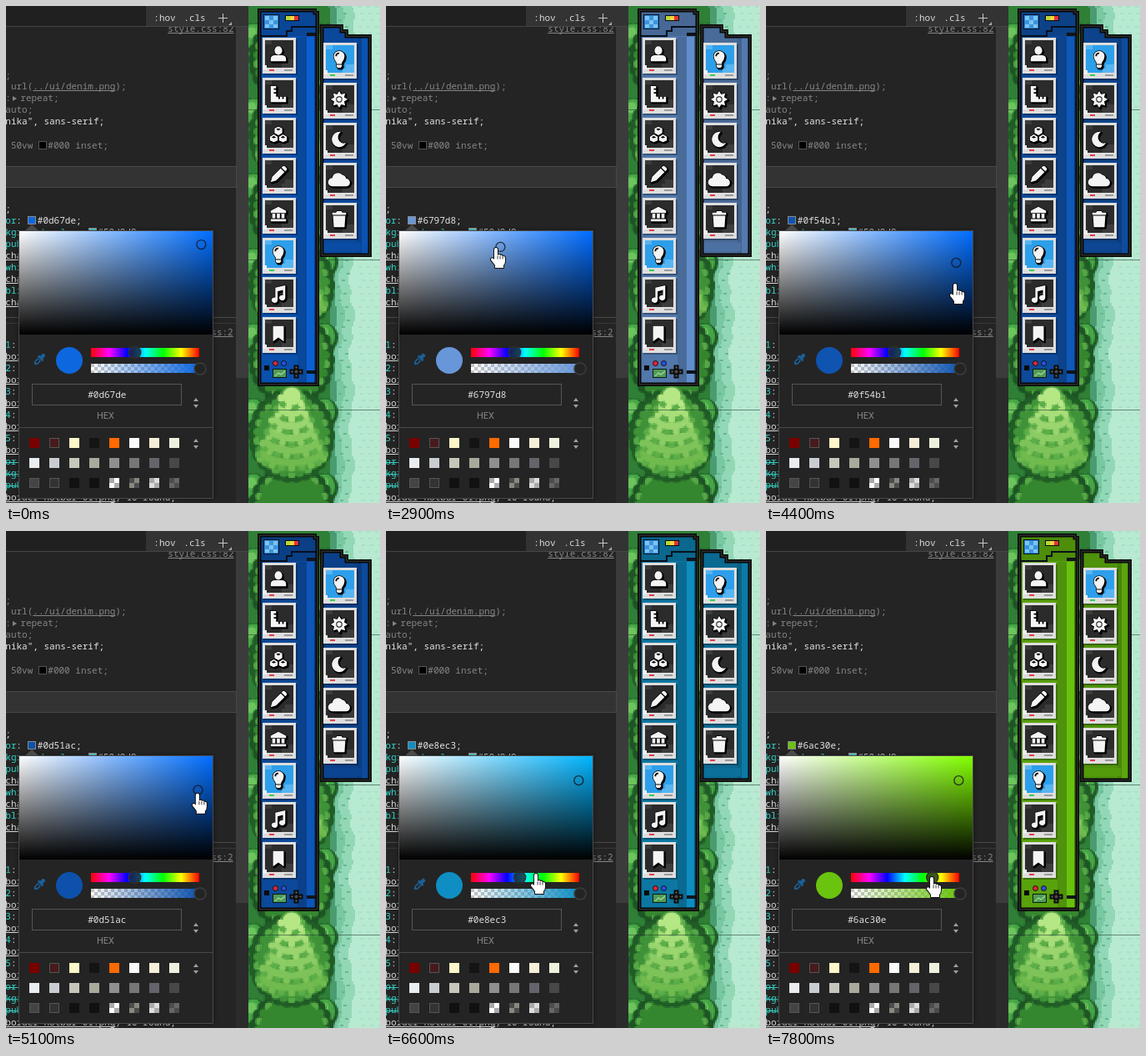
Animation of 449x596 px, one loop 8000 ms. Source, as an HTML page with a canvas:

```html
<!DOCTYPE html>
<html lang="en">
<head>
<meta charset="utf-8">
<title>Theme colour picker</title>
<style>
html, body { margin: 0; width: 449px; height: 596px; overflow: hidden; background: #242424; }
canvas { display: block; }
</style>
</head>
<body>
<canvas id="stage" width="449" height="596"></canvas>
<script>
const ctx = document.getElementById('stage').getContext('2d');
const LOOP = 8000, STEP = 100;
const MONO = '11px "Noto Sans Mono", "DejaVu Sans Mono", monospace';
const CYAN = '#35d4c7', GREY = '#858585', LIGHT = '#d8d8d8';

// ---------- colour ----------
function hexToHsv(hex) {
  const [r, g, b] = [1, 3, 5].map(i => parseInt(hex.substr(i, 2), 16) / 255);
  const v = Math.max(r, g, b), d = v - Math.min(r, g, b);
  let h = 0;
  if (d) h = v === r ? ((g - b) / d + 6) % 6 : v === g ? (b - r) / d + 2 : (r - g) / d + 4;
  return [h * 60, v ? d / v : 0, v];
}
function hsvToRgb(h, s, v) {
  return [5, 3, 1].map(n => {
    const k = (n + h / 60) % 6;
    return Math.round(255 * (v - v * s * Math.max(0, Math.min(k, 4 - k, 1))));
  });
}
const css = (c, k = 1) => `rgb(${c.map(n => Math.round(Math.min(255, n * k))).join(',')})`;
const toHex = c => '#' + c.map(n => n.toString(16).padStart(2, '0')).join('');

// ---------- timeline ----------
const DEEP = hexToHsv('#0e5cc3');
const COLORS = [
  [2000, ...hexToHsv('#0d67de')],
  [2900, ...hexToHsv('#6797d8')],
  [3800, 214, 0.74, 0.7],
  [4400, ...hexToHsv('#0f54b1')],
  [4600, 214, 0.92, 0.55],
  [4700, 214, 0.92, 0.55],
  [5400, ...DEEP],
  [6300, ...DEEP],
  [6600, ...hexToHsv('#0e8ec3')],
  [6800, 146, DEEP[1], DEEP[2]],
  [7200, 116, DEEP[1], DEEP[2]],
  [7800, ...hexToHsv('#6ac30e')]
];
// each run: shape, then time / x / y of the pointer tip
const RUNS = [
  ['arrow', [300, 402, 3], [400, 386, 14], [500, 370, 18], [600, 360, 6], [700, 360, 6]],
  ['hand', [1500, 316, 61], [1600, 331, 42]],
  ['arrow', [1600, 331, 42], [1900, 217, 298]],
  ['hand', [1900, 217, 300], [2000, 217, 300], [2100, 226, 290], [2900, 132, 290],
    [3800, 186, 318], [4400, 227, 333], [4700, 227, 336], [5400, 232, 299], [5700, 232, 299]],
  ['arrow', [5700, 194, 374], [5900, 166, 412]],
  ['hand', [5900, 160, 418], [6200, 155, 426], [6400, 158, 420], [6600, 180, 411],
    [7200, 190, 413], [7800, 199, 415], [8001, 199, 415]]
];
function track(keys, t) {
  if (t <= keys[0][0]) return keys[0].slice(1);
  for (let i = 1; i < keys.length; i++) {
    const a = keys[i - 1], b = keys[i];
    if (t === b[0]) return b.slice(1);
    if (t < b[0]) {
      const p = (t - a[0]) / (b[0] - a[0]);
      return a.slice(1).map((n, j) => n + (b[j + 1] - n) * p);
    }
  }
  return keys[keys.length - 1].slice(1);
}

// ---------- helpers ----------
function rect(x, y, w, h, fill) { ctx.fillStyle = fill; ctx.fillRect(x, y, w, h); }
function box(x, y, w, h, fill, line) {
  rect(x, y, w, h, line);
  rect(x + 1, y + 1, w - 2, h - 2, fill);
}
function disc(x, y, r, fill, line, width = 1) {
  ctx.beginPath();
  ctx.arc(x, y, r, 0, 7);
  if (fill) { ctx.fillStyle = fill; ctx.fill(); }
  if (line) { ctx.strokeStyle = line; ctx.lineWidth = width; ctx.stroke(); }
}
function text(s, x, y, color, mark) {
  ctx.font = MONO;
  ctx.fillStyle = color;
  ctx.fillText(s, x - 0.7, y + 4);
  if (mark) ctx.fillRect(x - 0.7, mark === 'under' ? y + 5 : y + 1, ctx.measureText(s).width, 1);
}
function fillPath(d, x, y, fill, line, width = 1, scale = 1) {
  const p = new Path2D(d);
  ctx.save();
  ctx.translate(x, y);
  ctx.scale(scale, scale);
  if (line) { ctx.strokeStyle = line; ctx.lineWidth = width; ctx.lineJoin = 'round'; ctx.stroke(p); }
  ctx.fillStyle = fill;
  ctx.fill(p, 'evenodd');
  ctx.restore();
}
function ramp(x0, y0, x1, y1, stops) {
  const g = ctx.createLinearGradient(x0, y0, x1, y1);
  stops.forEach((c, i) => g.addColorStop(i / (stops.length - 1), c));
  return g;
}
function checker(x, y, w, h, size, a, b) {
  rect(x, y, w, h, a);
  ctx.fillStyle = b;
  for (let j = 0; j * size < h; j++)
    for (let i = j % 2; i * size < w; i += 2)
      ctx.fillRect(x + i * size, y + j * size, Math.min(size, w - i * size), Math.min(size, h - j * size));
}
function spinner(x, y) {
  fillPath('M-3 -2H3L0 -6ZM-3 2H3L0 6Z', x, y, '#a0a0a0');
}

// ---------- scenery, painted once on a coarse grid ----------
function paintScenery() {
  const c = document.createElement('canvas');
  c.width = 80; c.height = 298;
  const g = c.getContext('2d'), mid = 26;
  const dot = (x, y, r, q, f) => { g.fillStyle = f; g.beginPath(); g.ellipse(x, y, r, q, 0, 0, 7); g.fill(); };
  const mix = k => `rgb(${112 + k * 14},${186 + k * 9},${78 + k * 11})`;

  for (let y = 0; y < 298; y++) {
    const w = Math.round(1.6 * Math.sin(y / 7) + 0.8 * Math.sin(y / 2.4));
    const bands = [[0, '#2f7f36'], [48 + w / 2, '#4a9c70'], [52 + w / 2, '#78c8a2'], [56 + w, '#92d8b6'], [62 + w, '#b8e9d1']];
    bands.forEach(([x, f]) => { g.fillStyle = f; g.fillRect(Math.round(x), y, 80, 1); });
    if (y % 4 === 0) {
      g.fillStyle = '#abe0c8';
      for (let x = 66; x < 80; x += 5) g.fillRect(x + y % 3, y, 2, 1);
      g.fillStyle = '#68b692';
      g.fillRect(53 + y % 7, y, 2, 2);
    }
  }
  function bush(cy, rim, leaf) {
    for (let i = 0; i < 26; i++) {
      const a = i * Math.PI / 13, x = mid + 22 * Math.cos(a), y = cy + 24 * Math.sin(a);
      dot(x, y, 4, 4, rim);
    }
    for (let i = 0; i < 26; i++) {
      const a = (i + 0.5) * Math.PI / 13, x = mid + 20.5 * Math.cos(a), y = cy + 22.5 * Math.sin(a);
      dot(x, y, 2.6, 2.6, i % 2 ? leaf : '#56a846');
    }
    dot(mid, cy, 20, 22, leaf);
  }
  for (let y = 19; y < 340; y += 45) {
    for (const x of [3, 46]) {
      dot(x, y, 8, 9, '#1f5a26');
      dot(x, y - 1, 6, 7.5, '#46a646');
      dot(x - 1, y - 3, 3, 3.5, '#6cc45c');
    }
    bush(y + 13, '#1d5424', '#35872f');
  }
  for (let cy = 78; cy < 300; cy += 90) {
    bush(cy, '#205c26', '#3f9238');
    for (let k = 0; k < 6; k++) {
      const y = cy + 11 - k * 6.8, w = 20 - k * 2.7;
      dot(mid, y, w + 1, 10 - k * 0.5, '#4c9c3e');
      const n = 10 - k;
      for (let i = 0; i <= n; i++) {
        const a = Math.PI * i / n;
        dot(mid + w * Math.cos(a), y + (8 - k * 0.5) * Math.sin(a), 2.2, 2.2, i % 2 ? mix(k) : '#5cae48');
      }
      dot(mid, y - 1, w - 1, 8 - k * 0.5, mix(k));
    }
  }
  return c;
}
const scenery = paintScenery();

// ---------- inspector ----------
function inspector(color) {
  rect(0, 0, 291, 596, '#242424');
  rect(276, 24, 15, 422, '#3b3b3b');
  rect(276, 446, 15, 150, '#2b2b2b');
  text('style.css:82', 195, 27, GREY, 'under');
  rect(0, 0, 168, 24, '#202020');
  rect(168, 0, 123, 24, '#333');
  rect(0, 24, 291, 1, '#454545');
  text(':hov', 178, 14, LIGHT);
  text('.cls', 214, 14, LIGHT);
  rect(255, 14, 11, 1, '#c8c8c8');
  rect(260, 9, 1, 11, '#c8c8c8');
  fillPath('M0 0V-4L-4 0Z', 271, 23, '#aaa');

  text(';', 0, 83, GREY);
  text('url(', 6.6, 96, GREY);
  text('../ui/denim.png', 33, 96, GREY, 'under');
  text(');', 132, 96, GREY);
  text(':', 0, 110, GREY);
  fillPath('M0 -3L5 0L0 3Z', 8, 111, GREY);
  text('repeat;', 18, 110, GREY);
  text('auto;', 0, 124, GREY);
  text('nika", sans-serif;', 0, 138, '#e4e4e4');
  text('50vw', 6.6, 167, GREY);
  box(39, 162, 10, 10, '#000', '#555');
  text('#000 inset;', 51, 167, GREY);
  box(-1, 192, 278, 26, '#333', '#484848');

  text(';', 0, 243, LIGHT);
  text('or', 0, 257, CYAN);
  text(':', 13, 257, LIGHT);
  box(26, 252, 10, 10, css(color), '#8a8a8a');
  text(toHex(color) + ';', 38.5, 257, '#e4e4e4');
  text('kground-color:', 0, 271, CYAN);
  box(99, 266, 10, 10, '#58d9d9', '#999');
  text('#58d9d9;', 111, 271, LIGHT);
  ['pub', 'cha', 'whi', 'cha', 'bli', 'cha'].forEach((s, i) =>
    text(s, 0, 285 + i * 14, i % 2 ? LIGHT : CYAN, i % 2 && 'under'));
  rect(0, 373, 276, 1, '#484848');
  rect(0, 380, 276, 1, '#383838');
  text('ss:2', 247, 391, GREY, 'under');
  for (let i = 0; i < 5; i++) {
    text(String(i + 1), 0, 406 + i * 28, CYAN);
    text(':', 6.6, 406 + i * 28, LIGHT);
    text('bor', 0, 420 + i * 28, LIGHT, 'under');
  }
  ['or:', 'kgr', 'pub'].forEach((s, i) => text(s, 0, 546 + i * 14, CYAN, 'strike'));
  text('border-hotbar-01.png', 0, 589, LIGHT, 'under');
  text(') 10 round;', 132, 589, LIGHT);
}

// ---------- picker ----------
const SWATCHES = [
  '#7a0000 #481a1c #fdf6c8 #141414 #ff6a00 #fafafa #f6eed8 #eef0de',
  '#e9edf0 #c9cdd2 #c6c6bb #a9aa9c #8f8f8f #777777 #64646a #484848',
  '#444444 #333333 #111111 #111111 #ffffff #88887e #dddddd #666666'
].map(row => row.split(' '));

function picker([h, s, v], color) {
  ctx.save();
  ctx.shadowColor = 'rgba(0,0,0,.5)';
  ctx.shadowBlur = 5;
  rect(15, 269, 234, 322, '#4a4a4a');
  ctx.restore();
  fillPath('M-9 8L0 0L9 8Z', 31, 262, '#4a4a4a');
  rect(16, 270, 232, 320, '#242424');
  const pure = css(hsvToRgb(h, 1, 1));
  rect(16, 270, 232, 124, ramp(16, 0, 248, 0, ['#fff', pure]));
  rect(16, 270, 232, 124, ramp(0, 270, 0, 394, ['rgba(0,0,0,0)', '#000']));
  disc(16 + 232 * s, 270 + 124 * (1 - v), 5.5, null, 'rgba(14,18,26,.8)', 1.3);

  // eyedropper
  ctx.save();
  ctx.translate(40, 424);
  ctx.rotate(Math.PI / 4);
  fillPath('M-2.5 -9Q0 -11 2.5 -9V-4H4.5V-1H-4.5V-4H-2.5ZM-3 0H3V6L1 9H-1L-3 6ZM-1.2 1V6H1.2V1Z', 0, 0, '#1a6099', null, 0, 0.9);
  ctx.restore();

  disc(76, 425, 16, css(color));
  rect(102, 410, 130, 11, ramp(102, 0, 232, 0, ['#f00', '#f0f', '#00f', '#0ff', '#0f0', '#ff0', '#f00']));
  checker(102, 429, 130, 11, 4, '#fff', '#c4c4c4');
  const clear = `rgba(${color.join(',')},0)`;
  rect(102, 429, 130, 11, ramp(102, 0, 232, 0, [clear, css(color)]));
  const hx = 102 + 130 * (1 - h / 360);
  disc(hx, 415.5, 7, 'rgba(30,30,34,.75)', '#303030', 1.5);
  disc(233, 435, 7, '#242424', '#3d3d3d', 1.5);

  box(31, 453, 180, 26, '#242424', '#565656');
  ctx.textAlign = 'center';
  text(toHex(color), 122, 466, '#e0e0e0');
  ctx.font = '11px Roboto, "Open Sans", sans-serif';
  ctx.fillStyle = '#858585';
  ctx.fillText('HEX', 119.5, 495);
  ctx.textAlign = 'left';
  spinner(228, 476);
  rect(16, 505, 232, 1, '#484848');
  SWATCHES.forEach((row, j) => row.forEach((c, i) => {
    const x = 28 + i * 24, y = 518 + j * 24;
    if (j === 2 && i > 3) checker(x, y, 12, 12, 6, c, i % 2 ? '#4c4c4c' : '#aaa');
    else box(x, y, 12, 12, c, j === 2 && i < 2 || !j && i === 1 ? '#555' : c);
  }));
  spinner(228, 525);
}

// ---------- game toolbar ----------
const ICONS = {
  user: 'M-5 -5A5 5.5 0 1 1 5 -5A5 5.5 0 1 1 -5 -5ZM-10 9V6Q-10 1 -4 1H4Q10 1 10 6V9Z',
  ruler: 'M-10 -11H-3V-8H-6V-6H-3V-3H-6V-1H-3V3H0V6H2V3H5V6H7V3H10V10H-10Z',
  cubes: 'M0 -10L5 -8V-2L0 1L-5 -2V-8ZM-6 0L-1 3V8L-6 10L-11 8V3ZM6 0L11 3V8L6 10L1 8V3ZM-3 -7L0 -5L3 -7L0 -8ZM-9 4L-6 5L-3 4L-6 2ZM3 4L6 5L9 4L6 2Z',
  pencil: 'M-10 10L-8 3L3 -8L8 -3L-3 8ZM4 -9L6 -11Q8 -12 11 -8Q12 -6 9 -4Z',
  bank: 'M0 -10L10 -5V-2H-10V-5ZM-8 -1H-4V5H-8ZM-2 -1H2V5H-2ZM4 -1H8V5H4ZM-10 6H10V9H-10Z',
  bulb: 'M-7 -4A7 7 0 0 1 7 -4Q7 0 3.5 4V6H-3.5V4Q-7 0 -7 -4ZM-3.5 7H3.5V9L2 11H-2L-3.5 9ZM-5 -4H-3Q-3 -7 0 -7V-9Q-5 -9 -5 -4Z',
  music: 'M-4 -8L9 -11V5A4 3.5 0 1 1 6 2V-5L-1 -3V8A4 3.5 0 1 1 -4 5Z',
  mark: 'M-7 -10H7V10L0 5L-7 10Z',
  moon: 'M2 -10Q-4 -4 0 2Q4 7 9 4Q6 10 -1 10A10 10 0 0 1 2 -10Z',
  cloud: 'M-9 9A5.5 5.5 0 0 1 -9 -2A7.5 7.5 0 0 1 4 -6A6 6 0 0 1 9 -1A5 5 0 0 1 9 9Z',
  trash: 'M-9 -9H-4L-3 -11H3L4 -9H9V-6H-9ZM-8 -5H8L7 10H-7Z'
};
ICONS.sun = 'M' + Array.from({ length: 16 }, (_, i) => {
  const r = i % 2 ? 7 : 11, a = i * Math.PI / 8;
  return `${r * Math.cos(a)} ${r * Math.sin(a)}`;
}).join('L') + 'ZM-4 0A4 4 0 1 0 4 0A4 4 0 1 0 -4 0ZM-3 0A3 3 0 1 1 3 0A3 3 0 1 1 -3 0Z';

function card(name, x, y, on) {
  rect(x + 1, y + 2, 41, 43, 'rgba(0,0,0,.3)');
  rect(x, y, 40, 43, '#dedede');
  rect(x + 3, y + 3, 34, 33, on ? '#2d9fea' : '#2b2b2b');
  ctx.fillStyle = on ? '#57b5f2' : '#3c3c3c';
  ctx.fillRect(x + 3, y + 3, 8, 5);
  ctx.fillRect(x + 27, y + 26, 10, 10);
  ctx.fillRect(x + 23, y + 31, 6, 5);
  rect(x + 1, y + 33, 4, 5, '#f0f0f0');
  rect(x + 8, y + 38, 6, 2, on ? '#35d04c' : '#e23c48');
  rect(x + 26, y + 38, 10, 2, '#9a9a9a');
  fillPath(ICONS[name], x + 20.5, y + 21.5, '#000', '#000', 2, 0.92);
  fillPath(ICONS[name], x + 19, y + 20, '#f4f4f4', '#000', 1.5, 0.92);
}
function panel(d, paint) {
  const p = new Path2D(d);
  ctx.save();
  ctx.clip(p);
  paint();
  [[9, '#080808'], [6, '#2b2b2b'], [3, '#0a0a0a']].forEach(([w, c]) => {
    ctx.lineWidth = w;
    ctx.strokeStyle = c;
    ctx.stroke(p);
  });
  ctx.restore();
}
// the denim texture evens out part of the colour's brightness
function toolbar([h, s, v]) {
  const color = hsvToRgb(h, s, (v + 0.87) / 2);
  const fill = (x, y, w, h, k) => rect(x, y, w, h, css(color, k));
  const pitch = 47.9;
  panel('M377 22H405V28H411V34H439V301H377Z', () => {
    fill(377, 22, 62, 280, 0.7);
    fill(422, 36, 5, 262, 0.64);
    fill(427, 36, 8, 262, 0.8);
    fill(381, 284, 45, 10, 0.74);
  });
  panel('M302 3H373V6H376V456H302Z', () => {
    fill(302, 3, 74, 453, 0.78);
    fill(306, 7, 66, 29, 0.68);
    fill(350, 37, 11, 416, 0.7);
    fill(361, 37, 9, 416, 0.93);
    fill(370, 37, 3, 416, 0.62);
    ctx.strokeStyle = '#08101c';
    ctx.lineWidth = 2;
    ctx.stroke(new Path2D('M306 36H337V30H343V25H372'));
    rect(361, 32, 11, 4, '#10141c');
    rect(361, 437, 11, 4, '#10141c');
  });

  box(309, 10, 19, 18, '#2f86d8', '#071322');
  checker(311, 12, 15, 14, 5, '#3d94dd', '#7cc4f2');
  rect(335, 11, 17, 7, '#0b0b0b');
  ['#b9d63c', '#f0d83a', '#e8323c'].forEach((c, i) => rect(336 + i * 5, 12, 5, 5, c));

  ['user', 'ruler', 'cubes', 'pencil', 'bank', 'bulb', 'music', 'mark'].forEach((n, i) =>
    card(n, 308, Math.round(38 + i * pitch), n === 'bulb'));
  ['bulb', 'sun', 'moon', 'cloud', 'trash'].forEach((n, i) =>
    card(n, 381, Math.round(44 + i * pitch), n === 'bulb'));

  rect(310, 431, 6, 6, '#0a0a0a');
  disc(323.5, 428.5, 3, '#e0263a', '#101010');
  disc(333.5, 428.5, 3, '#2c50e0', '#101010');
  box(320, 435, 17, 11, '#4f9a58', '#0c1c10');
  fillPath('M2 9L7 4L10 6L15 2V4L10 8L7 6L4 9Z', 320, 435, '#92d08a');
  fillPath('M-3 -8H3V-3H8V3H3V8H-3V3H-8V-3H-3Z', 348.5, 438.5, '#0c0c0c');
  disc(348.5, 438.5, 2, '#4a4a4a');
  [[0, -5], [0, 5], [-5, 0], [5, 0]].forEach(([x, y]) => rect(347.5 + x, 437.5 + y, 2, 2, '#666'));
}

// ---------- pointer ----------
const POINTERS = {
  arrow: 'M0 0V17L4 13.5L7 19.5L10 18.2L7.2 12.3H12Z',
  hand: 'M-2 2Q-2 0 0 0Q2 0 2 2V9Q4 7 5.3 9Q7 8 8.3 10Q11 9.5 11 12V16Q11 19 9 21V24H-1V21Q-3 18 -6 14.5Q-6 11.5 -3.6 12.5L-2 14Z'
};
function pointer(t) {
  const run = RUNS.find(r => t >= r[1][0] && t < r[r.length - 1][0]);
  if (!run) return;
  const [x, y] = track(run.slice(1), t);
  fillPath(POINTERS[run[0]], x, y, '#fff', '#111', 2);
  if (run[0] === 'hand') [2, 5, 8].forEach(dx => rect(x + dx - 0.4, y + 9.5, 0.9, 4, '#222'));
}

function draw(t) {
  const hsv = track(COLORS, t), color = hsvToRgb(...hsv);
  ctx.imageSmoothingEnabled = false;
  ctx.drawImage(scenery, 291, 0, 160, 596);
  [125, 305, 485].forEach(y => rect(291, y - 1, 158, 1, 'rgba(30,60,50,.55)'));
  inspector(color);
  picker(hsv, color);
  toolbar(hsv);
  pointer(t);
}

let shown = -1;
function tick() {
  const t = Math.floor((performance.now() % LOOP) / STEP) * STEP;
  if (t !== shown) draw(shown = t);
  requestAnimationFrame(tick);
}
tick();
</script>
</body>
</html>
```
